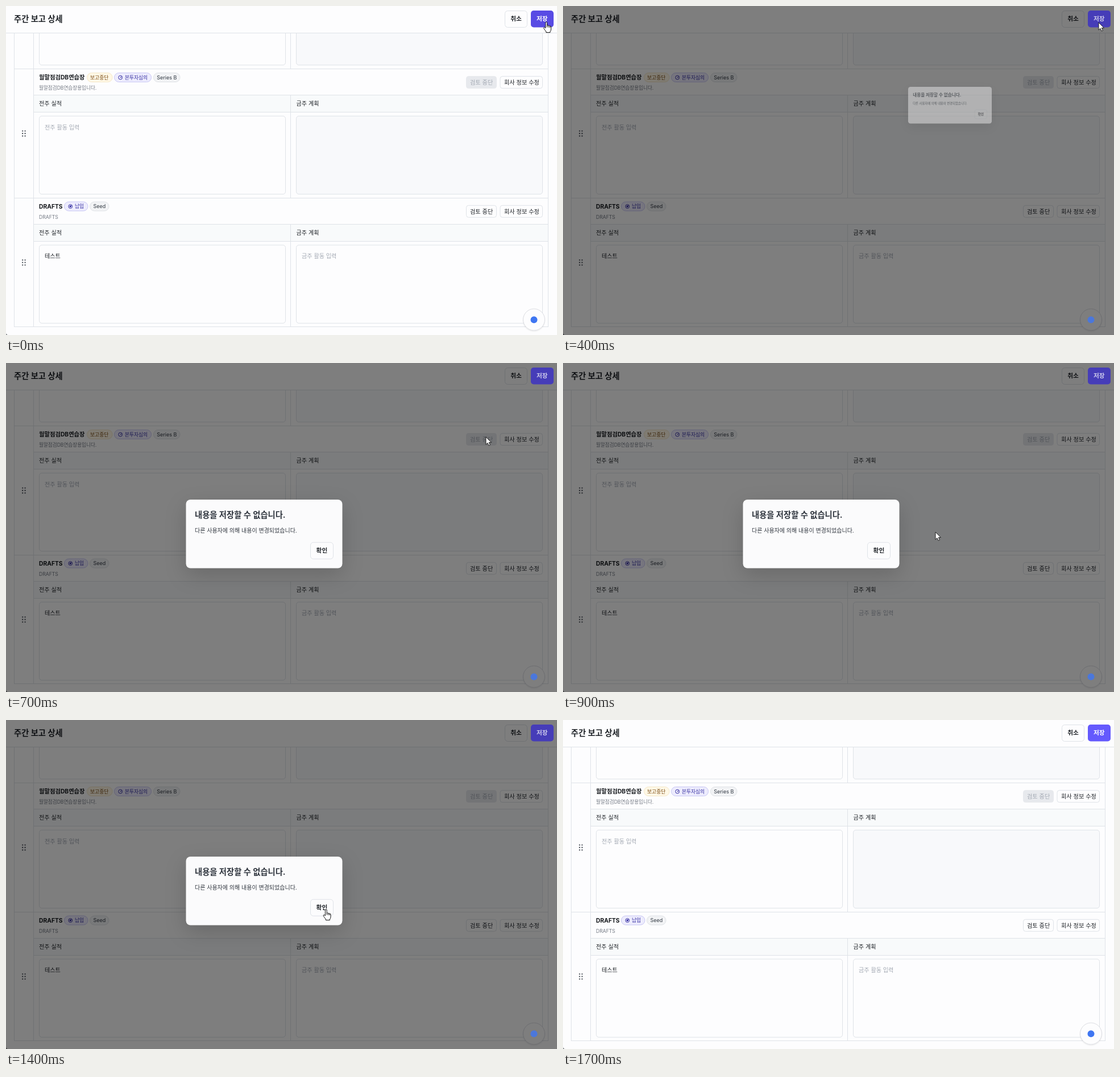
An HTML page for the animation above (2.4 s loop, 969 px wide and 578 px high).

```html
<!DOCTYPE html>
<html lang="ko">
<head>
<meta charset="utf-8">
<title>주간 보고 상세</title>
<style>
  html, body { margin: 0; width: 100%; height: 100%; overflow: hidden; background: #fdfdfe; }
  svg { display: block; width: 969px; height: 578px; }
  text { font-family: Inter, 'Noto Sans CJK KR', 'Noto Sans CJK', sans-serif; white-space: pre; }
  #dialog > rect:first-child { filter: drop-shadow(0 12px 18px rgba(0, 0, 0, .16)); }
</style>
</head>
<body>
<svg id="stage" viewBox="0 0 969 578" xmlns="http://www.w3.org/2000/svg"></svg>
<script>
const PAPER = '#fdfdfe', LINE = '#dfe3e8', INK = '#1f2328', MUTED = '#a3a9b3';
const ROW = 226.5;

const text = (x, y, size, label, fill = INK, weight = 400) =>
  `<text x="${x}" y="${y}" font-size="${size}" fill="${fill}" font-weight="${weight}">${label}</text>`;
const box = (x, y, w, h, r, fill = PAPER, stroke = LINE) =>
  `<rect x="${x}" y="${y}" width="${w}" height="${h}" rx="${r}" fill="${fill}" stroke="${stroke}"/>`;
const line = (x1, y1, x2, y2) =>
  `<path d="M${x1} ${y1}L${x2} ${y2}" stroke="${LINE}" shape-rendering="crispEdges"/>`;

function pill(x, y, w, label, [fill, stroke, ink], textX, size = 8.8) {
  return box(x, y, w, 16, 8, fill, stroke) + text(textX, y + 11.4, size, label, ink);
}
const AMBER = ['#fff8e6', '#f5e8c8', '#7a4a12'];
const VIOLET = ['#edecfd', '#c9c7f5', '#3730a3'];
const GRAY = ['#f2f3f5', '#e0e3e7', '#333a44'];

function handle(y) {
  let dots = '';
  for (let i = 0; i < 6; i++)
    dots += `<circle cx="${29.2 + (i % 2) * 4.4}" cy="${y + (i >> 1) * 4.4}" r="1.15" fill="#444a52"/>`;
  return dots;
}

function pair(y, h, rightFill = PAPER) {
  return box(58.5, y, 433, h, 4.5) + box(510.5, y, 433, h, 4.5, rightFill);
}

function row(y, { name, about, badges, left, right, stopped }) {
  const [stopFill, stopInk] = stopped ? ['#e7e9ed', MUTED] : [PAPER, INK];
  const line1 = Math.round(y + 46) + .5, line2 = Math.round(y + 75.6) + .5;
  return `<rect x="49" y="${line1}" width="904" height="${line2 - line1}" fill="#f8fafb"/>`
    + line(14, Math.floor(y) + .5, 953, Math.floor(y) + .5)
    + line(49, line1, 953, line1) + line(49, line2, 953, line2)
    + line(500.5, line1, 500.5, y + ROW)
    + handle(y + 109.3)
    + text(58, y + 18.5, 10.3, name, '#15181c', 700)
    + text(58, y + 36.8, 8.6, about, '#747a84')
    + badges
    + box(809.5, y + 13.3, 53, 21, 4, stopFill, stopped ? stopFill : LINE)
    + text(816, y + 27.6, 10.2, '검토 중단', stopInk)
    + box(869, y + 13.3, 74.5, 21, 4) + text(876, y + 27.6, 10.2, '회사 정보 수정')
    + text(58, y + 65, 10.1, '전주 실적') + text(510.5, y + 65, 10.1, '금주 계획')
    + pair(y + 83, 137.3, stopped ? '#f8f9fb' : PAPER)
    + text(68, y + 106.3, 10.1, left, stopped ? MUTED : INK)
    + text(520, y + 106.3, 10.1, right, MUTED);
}

const gauge = `<g fill="none" stroke="#3730a3"><circle cx="201.2" cy="125.6" r="3.4"/>
  <path d="M201.2 125.6L203.2 123.6M201.2 125.6H203"/></g>`;
const dial = `<g fill="none" stroke="#3730a3"><circle cx="113.3" cy="352.1" r="3.4"/>
  <circle cx="113.3" cy="352.1" r="1.3" fill="#3730a3"/><path d="M113.3 352L115.3 350"/></g>`;

const page = `<rect width="969" height="578" fill="${PAPER}"/>`
  + pair(-30, 133.8, '#f8f9fb') + line(500.5, 40, 500.5, 110)
  + row(110.3, {
      name: '월말점검DB연습장', about: '월말점검DB연습장용입니다.', stopped: true,
      badges: pill(142.5, 117.5, 44.5, '보고중단', AMBER, 148)
        + pill(190.5, 117.5, 65, '본투자심의', VIOLET, 209, 8.7) + gauge
        + pill(259.5, 117.5, 46.5, 'Series B', GRAY, 265.3, 9),
      left: '전주 활동 입력', right: ''
    })
  + row(337, {
      name: 'DRAFTS', about: 'DRAFTS',
      badges: pill(102.5, 344, 41.5, '납입', VIOLET, 121) + dial
        + pill(147.5, 344, 33.5, 'Seed', GRAY, 153.4, 9),
      left: '테스트', right: '금주 활동 입력'
    })
  + [14.5, 48.5, 953.5].map(x => line(x, 47, x, 563)).join('') + line(14, 563.5, 954, 563.5)
  + `<rect width="969" height="47" fill="${PAPER}"/>` + line(0, 47.5, 969, 47.5)
  + text(14, 28, 14.3, '주간 보고 상세', INK, 700)
  + box(877.5, 8.5, 39, 29, 5) + text(887.2, 26, 10.7, '취소', INK, 600)
  + `<circle cx="928.5" cy="552.5" r="20" fill="#000" opacity=".04"/>`
  + `<circle cx="928.5" cy="551" r="19" fill="${PAPER}" stroke="#dcdde2"/>`
  + `<path d="M0 574Q0 578 4 578H0Z" fill="#62656a"/>`;

const dialog = box(316.5, 240, 275, 120.5, 8, '#fbfbfc', 'none')
  + text(332, 271.7, 14.3, '내용을 저장할 수 없습니다.', '#30363f', 700)
  + text(332, 297.6, 10, '다른 사용자에 의해 내용이 변경되었습니다.', '#30363f')
  + box(535.5, 315.2, 40, 29, 5, '#fcfcfd') + text(545.6, 332.8, 10.7, '확인', INK, 600);

const stage = document.getElementById('stage');
stage.innerHTML = page
  + `<rect id="mask" width="969" height="578" opacity=".5"/>
  <rect id="save" x="923" y="8" width="40" height="29.5" rx="5"/>
  <g id="saveLabel">${text(933, 26, 10.7, '저장', '#fff', 600)}</g>
  <circle id="badge" cx="928.5" cy="551.3" r="6" fill="#3f76f2"/>
  <g id="dialog">${dialog}</g>
  <path id="arrow" d="M0 0V13.2L3 10.4L5.1 15L7.4 14L5.3 9.6H9.4Z" fill="#fff" stroke="#111" stroke-width=".9"/>
  <path id="hand" d="M-1.6 1.4Q-1.6 0 -.2 0Q1.2 0 1.2 1.4V6Q2.6 5.2 3.7 6.6Q5 5.9 6 7.3Q8 6.8 8 9V13Q8 15.5 6.4 17V18.6H-.6V17Q-2.6 14.6 -4.6 11.4Q-5.3 9.8 -4 9.3Q-2.8 9 -1.6 11ZM1.2 6V9.4M3.7 6.8V9.8M6 7.4V10"
    fill="#fff" stroke="#111" stroke-width="1"/>`;
const el = id => document.getElementById(id);
const show = (id, on) => el(id).setAttribute('visibility', on ? 'visible' : 'hidden');

function bezier(x1, y1, x2, y2) {
  const at = (a, b, u) => 3 * (1 - u) ** 2 * u * a + 3 * (1 - u) * u * u * b + u ** 3;
  return x => {
    if (x <= 0 || x >= 1) return x <= 0 ? 0 : 1;
    let low = 0, high = 1;
    for (let i = 0; i < 24; i++) {
      const mid = (low + high) / 2;
      if (at(x1, x2, mid) < x) low = mid; else high = mid;
    }
    return at(y1, y2, low);
  };
}
const easeOut = bezier(.08, .82, .17, 1);
const easeInOut = bezier(.78, .14, .15, .86);

const LOOP = 2400, STEP = 100, ZOOM = 200;
const OPEN = 389, CLOSE = 1483;
const CLICK = { x: 941, y: 29.5 };
// time, x, y, pointer shape
const pointer = [
  [0, 950.5, 28, 'hand'], [100, 942, 29, 'hand'], [400, 942, 29, 'arrow'],
  [600, 908, 62, 'arrow'], [700, 844, 130, 'arrow'], [800, 759, 223, 'arrow'],
  [900, 655, 297, 'arrow'], [1000, 614, 318, 'arrow'], [1100, 598, 324, 'arrow'],
  [1200, 584, 328, 'arrow'], [1300, 566, 331, 'hand'], [1400, 563, 333, 'hand'],
  [1600, 0, 0, 'none']
];

function draw(time) {
  const t = Math.floor(time % LOOP / STEP) * STEP;
  const masked = t >= 400 && t < 1700;
  show('mask', masked);
  el('save').setAttribute('fill', masked ? '#463db8' : t < 400 ? '#584be4' : '#6459fd');
  el('saveLabel').setAttribute('opacity', masked ? .72 : 1);
  el('badge').setAttribute('opacity', masked ? .8 : 1);

  const shown = easeOut((t - OPEN) / ZOOM) * (1 - easeInOut((t - CLOSE) / ZOOM));
  const scale = .2 + .8 * shown;
  show('dialog', masked);
  el('dialog').setAttribute('opacity', shown);
  el('dialog').setAttribute('transform',
    `translate(${CLICK.x * (1 - scale)} ${CLICK.y * (1 - scale)}) scale(${scale})`);

  const [, x, y, shape] = pointer.findLast(key => key[0] <= t);
  for (const id of ['arrow', 'hand']) {
    show(id, id === shape);
    el(id).setAttribute('transform', `translate(${x} ${y})`);
  }
}

const start = performance.now();
function tick() {
  draw(performance.now() - start);
  requestAnimationFrame(tick);
}
tick();
</script>
</body>
</html>
```
